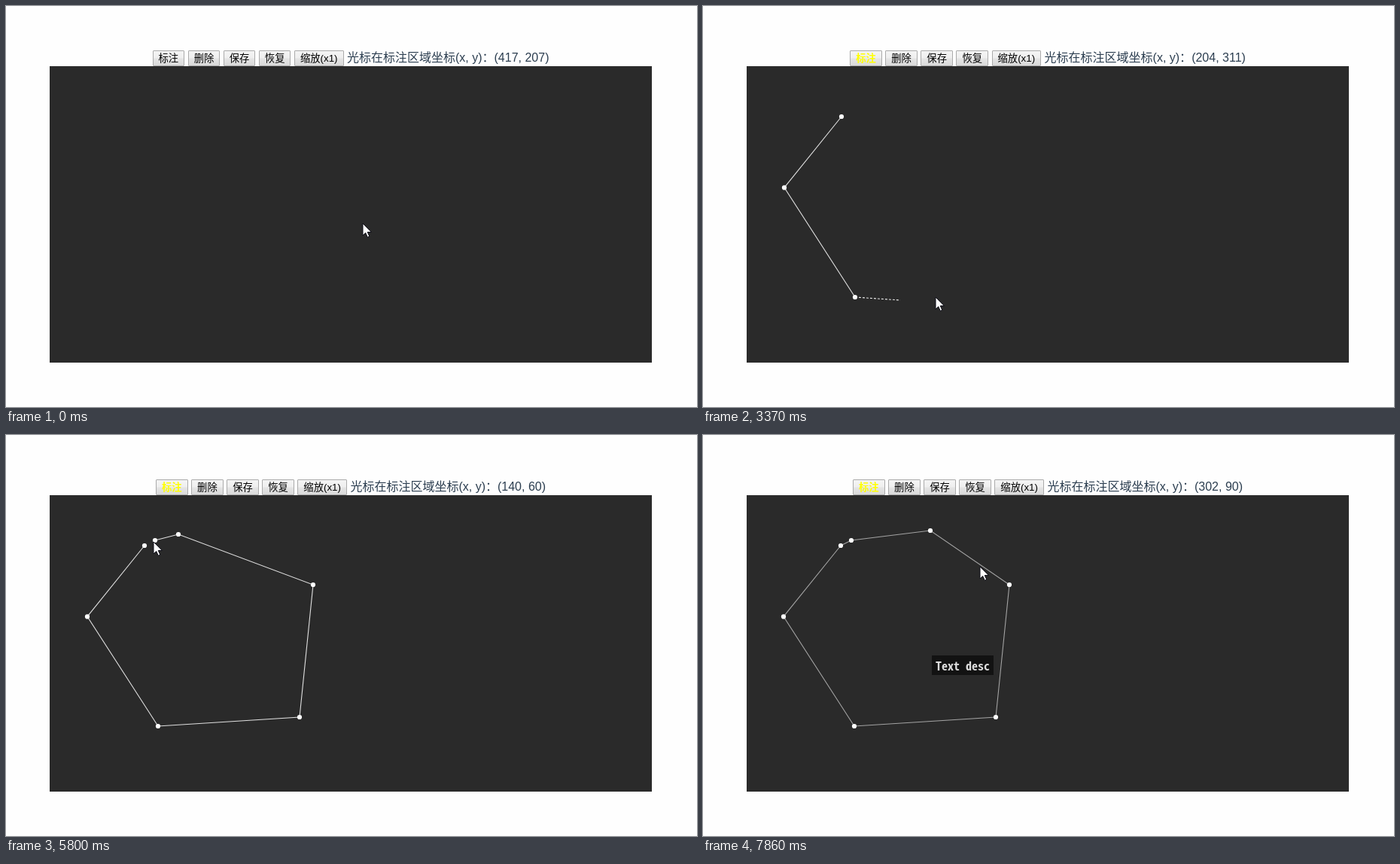
Write an HTML page with a canvas that moves like this. It is 918 px wide and 533 px high and loops after 8000 ms.

```html
<!DOCTYPE html>
<html lang="zh-CN">
<head>
<meta charset="utf-8">
<title>标注</title>
<style>
html, body { margin: 0; width: 100%; height: 100%; overflow: hidden; background: #fefefe; }
body { position: relative; font-family: "Liberation Sans", "Noto Sans CJK SC", "Noto Sans CJK", sans-serif; }
#bar {
  position: absolute; left: 58px; top: 58px; width: 800px; height: 22px;
  display: flex; justify-content: center; gap: 4.45px;
  font-size: 16px; line-height: 21px; color: #2c3e50; white-space: nowrap;
}
#label { font-weight: 300; }
.btn {
  box-sizing: border-box; height: 21px; margin-top: 1px; padding: 0 7px;
  border: 1px solid #ababab; border-radius: 1px;
  background: linear-gradient(#f4f4f4, #efefef 45%, #e4e4e4 55%, #dadada);
  font-size: 13.333px; line-height: 19px; color: #000;
}
.btn.hover { border-color: #666; }
.btn.on { color: #ff0; font-weight: bold; }
#area { position: absolute; left: 58px; top: 80px; width: 800px; height: 394px; background: #2a2a2a; }
#desc {
  position: absolute; left: 304px; top: 293px; width: 82px; height: 26px;
  background: #121212; color: #dcdcdc; text-align: center; white-space: nowrap;
  font: bold 16px/27px "Noto Sans Mono CJK SC", "Liberation Mono", monospace;
}
canvas { position: absolute; left: 0; top: 0; }
</style>
</head>
<body>
<div id="bar">
  <div class="btn" id="mark">标注</div>
  <div class="btn">删除</div>
  <div class="btn">保存</div>
  <div class="btn">恢复</div>
  <div class="btn">缩放(x1)</div>
  <div id="label">光标在标注区域坐标(x, y)：<span id="pos"></span></div>
</div>
<div id="area"></div>
<div id="desc">Text desc</div>
<canvas id="view" width="918" height="533"></canvas>
<script>
const LOOP = 8000, LAG = 60;
const AREA = { x: 58, y: 80 };

// bursts of even refreshes: first, last, count
const bursts = [
  [280, 1260, 8], [1530, 2470, 8], [2590, 3500, 8], [3670, 4640, 8],
  [4760, 5300, 5], [5650, 6630, 8], [6760, 6910, 2], [7330, 7860, 5]
];
const ticks = [0, ...bursts.flatMap(([a, b, n]) =>
  Array.from({ length: n }, (_, i) => a + (b - a) * i / (n - 1)))];

// where the mouse rests: arrival, departure, x, y, action halfway through the rest
const stops = [
  [-LAG, 280, 474.5, 287],
  [1060, 1060, 225, 82],
  [1120, 1500, 218, 70, "press"],
  [1900, 2100, 184, 147, "corner"],
  [2400, 2780, 108, 241.4, "corner"],
  [3070, 3140, 202, 387, "corner"],
  [3310, 3310, 262, 391],
  [3455, 3870, 390, 375, "corner"],
  [4300, 4420, 408, 199, "corner"],
  [4810, 4970, 229, 132, "corner"],
  [5240, 5760, 198, 140, "corner"],
  [5900, 6000, 184, 147, "close"],
  [6290, 6290, 246, 191],
  [6400, 6400, 247, 148],
  [6620, 7240, 228.4, 132, "grab"],
  [7530, 7600, 302, 127, "drop"],
  [7800, 7800, 360, 170],
  [7860, LOOP, 369, 173]
].map(([from, to, x, y, act]) => ({ from, to, x, y, act, time: (from + to) / 2 }));

const find = act => stops.find(s => s.act === act);
const corners = stops.filter(s => s.act === "corner");
const press = find("press"), close = find("close"), grab = find("grab"), drop = find("drop");
const exit = stops[1], DRAGGED = 5;

const $ = id => document.getElementById(id);
const mark = $("mark"), pos = $("pos"), desc = $("desc");
const ctx = $("view").getContext("2d");
const arrow = new Path2D("M0 0V16L3.7 12.6L6.3 18.3L8.8 17.2L6.3 11.6H11.4Z");

const ease = u => u * u * (3 - 2 * u);

function at(t) {
  const i = stops.findIndex(s => s.to >= t);
  const b = stops[i];
  if (t >= b.from) return [b.x, b.y];
  const a = stops[i - 1], u = ease((t - a.to) / (b.from - a.to));
  return [a.x + (b.x - a.x) * u, a.y + (b.y - a.y) * u];
}

// the page lags behind and keeps its last value while the mouse is over the toolbar
function tracked(t) {
  const p = at(t - LAG);
  return p[1] < AREA.y ? [exit.x, exit.y] : p;
}

function stroke(points, color, closed, dash = []) {
  ctx.beginPath();
  points.forEach(p => ctx.lineTo(...p));
  if (closed) ctx.closePath();
  ctx.setLineDash(dash);
  ctx.lineWidth = 1.1;
  ctx.strokeStyle = color;
  ctx.stroke();
}

function drawShape(t, tip) {
  const closed = t >= close.time;
  const points = corners.filter(c => t >= c.time).map(c => [c.x - closed, c.y]);
  if (!points.length) return;
  if (t >= grab.time) points[DRAGGED] = at(Math.min(t - LAG, drop.time));
  if (!closed) stroke([points[points.length - 1], tip], "#e4e4e4", false, [3, 2]);
  stroke(points, closed ? "#a4a4a4" : "#e0e0e0", closed);
  ctx.fillStyle = "#fff";
  for (const [x, y] of points) {
    ctx.beginPath();
    ctx.arc(x, y, 3.1, 0, 7);
    ctx.fill();
  }
}

function drawCursor([x, y]) {
  ctx.save();
  ctx.translate(Math.round(x - 0.6), Math.round(y + 1.5));
  ctx.setLineDash([]);
  ctx.lineWidth = 1;
  ctx.strokeStyle = "#0c0c16";
  ctx.fillStyle = "#fff";
  ctx.fill(arrow);
  ctx.stroke(arrow);
  ctx.restore();
}

function render(t) {
  const mouse = at(t), tip = tracked(t);
  mark.classList.toggle("hover", mouse[1] < AREA.y);
  mark.classList.toggle("on", t >= press.time);
  pos.textContent = `(${Math.round(tip[0] - AREA.x)}, ${Math.round(tip[1] - AREA.y)})`;
  desc.style.display = t >= close.time ? "block" : "none";
  ctx.clearRect(0, 0, 918, 533);
  drawShape(t, tip);
  drawCursor(mouse);
}

const start = performance.now();
let shown = -1;
function loop() {
  const now = (performance.now() - start) % LOOP;
  const t = ticks.filter(k => k <= now).pop();
  if (t !== shown) render(shown = t);
  requestAnimationFrame(loop);
}
loop();
</script>
</body>
</html>
```
